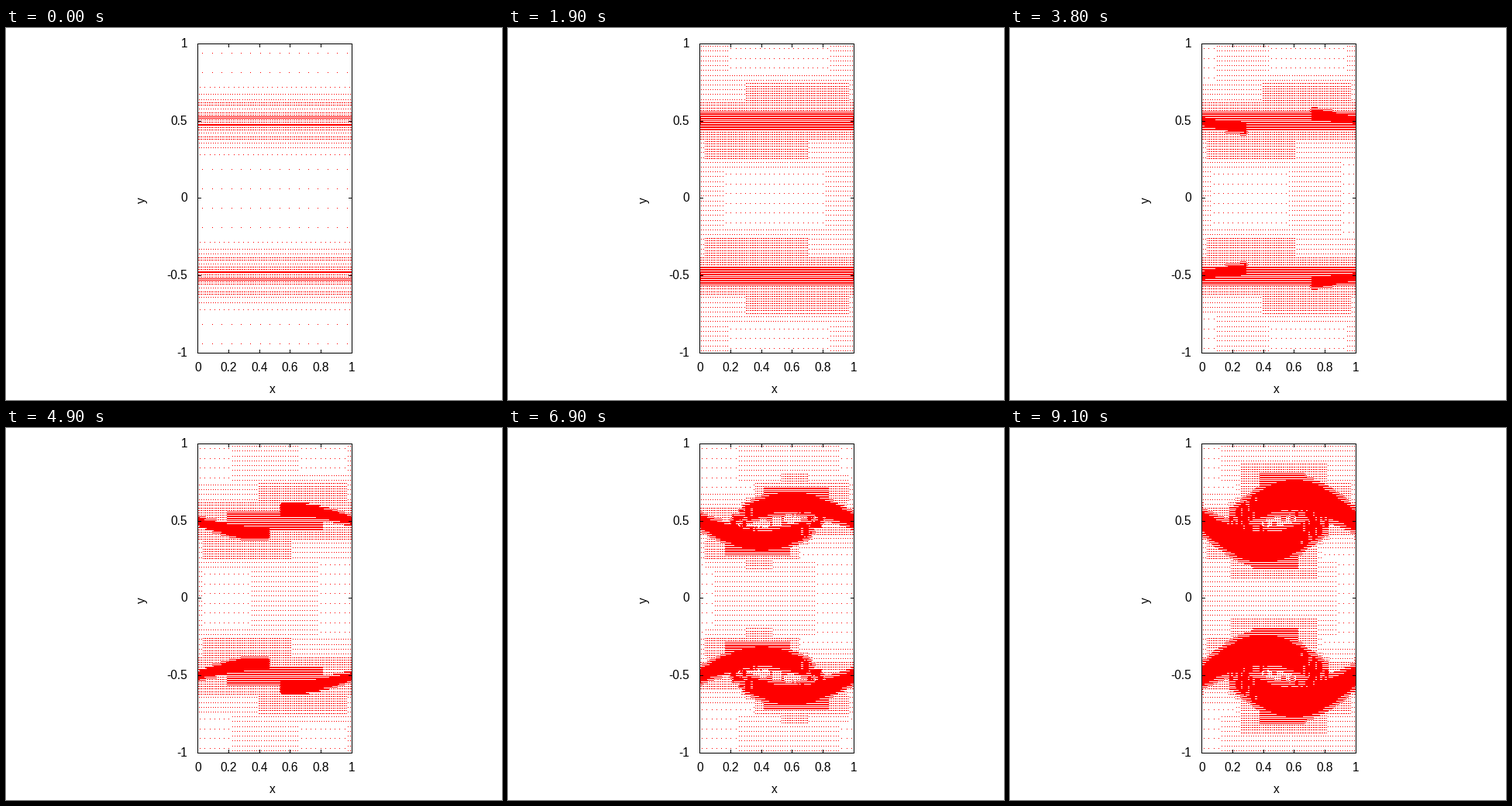
Animation of 640 by 480 pixels, one loop 9200 ms. Source, as a matplotlib script:

```python
import matplotlib.pyplot as plt
import numpy as np
from matplotlib.animation import FuncAnimation

W, H, DPI = 640, 480, 100
FRAMES, INTERVAL = 92, 100
LEFT, TOP, RIGHT, BOTTOM = 247, 20, 446, 419
NX, NY, MAX_LEVEL = 512, 256, 5      # finest cells in the unit square

X = (np.arange(NX) + 0.5)[None, :] / NX
Y = (np.arange(NY) + 0.5)[:, None] / NY
NOISE = np.random.default_rng(4).random((NY // 8, NX // 8)).repeat(8, 0).repeat(8, 1)


def ramp(frame, start, end):
    return min(max((frame - start) / (end - start), 0), 1)


def initial_levels():
    """Uniform rows around the undisturbed layer."""
    edges = np.array([1, 2, 4, 6, 8, 12, 16]) / 64
    levels = np.array([3, 4, 3, 2, 3, 2, 1, 0])
    return levels[np.searchsorted(edges, np.abs(Y - 0.5))] + 0 * X.astype(int)


def raise_level(want, level, region):
    np.maximum(want, level, out=want, where=region & np.ones_like(want, bool))


def box(x0, x1, y0, y1):
    return (X > x0) & (X < x1) & (Y > y0) & (Y < y1)


def add_coarse(want, frame):
    """Level 2: the wide layer and the patches that drift with the flow."""
    raise_level(want, 2, box(0, 1, 0.25 + 0.0625 * ramp(frame, 50, 65), 0.5))
    if frame < 55:
        raise_level(want, 2, box(0, 1 - 0.36 * ramp(frame, 20, 27), 0.1875, 0.25))
    low = 0.8125 * (1 - ramp(frame, 27, 95)) ** 2
    high = 1 - 0.28 * np.sin(np.pi * ramp(frame, 27, 103))
    raise_level(want, 2, box(low, high, 0, 0.25))
    raise_level(want, 2, box(0, 0.1875 * (1 - ramp(frame, 10, 50)), 0, 0.25))
    blip = 0.0625 * (1 - ramp(frame, 10, 18))
    raise_level(want, 2, box(0.5 - blip, 0.5 + blip, 0, 0.25))


def add_medium(want, frame):
    """Level 3: the inner layer, its lower shelf and the late halo."""
    raise_level(want, 3, box(0, 1, 0.375 + 0.03125 * ramp(frame, 50, 65), 0.5))
    if frame > 2:
        high = 0.6 + 0.18 * (1 - ramp(frame, 10, 30)) + 0.15 * ramp(frame, 61, 91)
        raise_level(want, 3, box(1 / 32, high, 0.25, 0.375))
    if frame > 4:
        corner = 0.125 * (1 - ramp(frame, 10, 18))
        raise_level(want, 3, box(0, corner, 0, corner))
    late = ramp(frame, 77, 91)
    middle = 0.39 + 0.08 * late
    half = 0.175 * ramp(frame, 64, 75) + 0.1 * late
    floor = 0.25 - 0.125 * ramp(frame, 64, 75)
    raise_level(want, 3, box(middle - half, middle + half, floor, 0.25))


def add_fine(want, frame):
    """Level 4: the core stripes and the stripes under the rolled layer."""
    if frame < 58:
        inset = 0.22 * ramp(frame, 42, 50)
        raise_level(want, 4, box(inset, 1 - inset, 0.46875 - 0.03125 * ramp(frame, 1, 6), 0.5))
    grow = ramp(frame, 52, 61)
    if grow > 0:
        low = 0.34 - 0.2 * grow + 0.2 * ramp(frame, 65, 91)
        high = 0.37 + 0.2 * grow + 0.05 * ramp(frame, 61, 91)
        floor = 0.375 - 0.0625 * grow - 0.125 * ramp(frame, 61, 93)
        raise_level(want, 4, box(low, high, floor, 0.4))


def add_strand(want, frame, noise):
    """Levels 4 and 5 along the sine-shaped, lengthening shear layer."""
    arch = np.sin(np.pi * np.clip(X / 0.8, 0, 1))
    centre = 0.5 - 0.17 * ramp(frame, 27, 91) ** 0.75 * arch
    thick = 0.034 + 0.06 * ramp(frame, 55, 88)
    half = thick * (0.6 + 0.4 * arch)
    end = 0.82 * np.sin(np.pi / 2 * ramp(frame, 18, 91)) ** 1.2
    offset = np.abs(Y - centre)
    raise_level(want, 4, (offset < half + 0.3 * thick) & (X < end))
    raise_level(want, 5, (offset < half) & (X < end) & ((X < 0.64) | (noise > 0.35)))


def add_eye(want, frame, noise):
    """Broken patches inside the vortex, densest at its rim."""
    radius = np.hypot((X - 0.5) / 0.3, (Y - 0.5) / 0.11)
    inside = radius < 1
    grow = ramp(frame, 64, 91)
    raise_level(want, 3, inside)
    raise_level(want, 4, inside & (noise > 0.9 - 0.2 * grow))
    raise_level(want, 5, inside & (noise > 1.35 - 0.6 * radius - 0.1 * grow))


def wanted_levels(frame):
    if frame == 0:
        return initial_levels()
    want = np.ones((NY, NX), int)
    noise = np.roll(NOISE, 8 * (frame // 4), axis=1)
    for add in (add_coarse, add_medium, add_fine):
        add(want, frame)
    if frame >= 18:
        add_strand(want, frame, noise)
    if frame > 64:
        add_eye(want, frame, noise)
    return np.maximum(want, want[::-1, ::-1])


def pool(mask, n):
    rows, cols = mask.shape
    return mask.reshape(rows // n, n, cols // n, n).any(axis=(1, 3))


def grow_one(mask):
    out = mask | np.roll(mask, 1, 1) | np.roll(mask, -1, 1)
    out[1:] |= mask[:-1]
    out[:-1] |= mask[1:]
    return out


def cell_centres(want):
    """Leaves of a quadtree whose neighbours differ by at most one level."""
    split = [None] * MAX_LEVEL + [np.zeros((NY, NX), bool)]
    for level in range(MAX_LEVEL - 1, -1, -1):
        split[level] = pool(want > level, 2 ** (MAX_LEVEL - level))
        split[level] |= pool(grow_one(split[level + 1]), 2)
    xs, ys = [], []
    exists = np.ones_like(split[0])
    for level in range(MAX_LEVEL + 1):
        rows, cols = np.nonzero(exists & ~split[level])
        xs.append((cols + 0.5) / (16 << level))
        ys.append((rows + 0.5) / (8 << level))
        exists = split[level].repeat(2, 0).repeat(2, 1)
    return np.concatenate(xs), np.concatenate(ys)


def column(x):
    return np.floor(LEFT + (RIGHT - LEFT) * x + 0.5).astype(int)


def row(y):
    return BOTTOM - np.floor((BOTTOM - TOP) * (y + 1) / 2 + 0.5).astype(int)


def draw_axes(image):
    for px in column(np.arange(6) / 5):
        image[TOP:TOP + 5, px] = image[BOTTOM - 4:BOTTOM + 1, px] = 0
    for py in row(np.arange(-2, 3) / 2):
        image[py, LEFT:LEFT + 5] = image[py, RIGHT - 4:RIGHT + 1] = 0
    image[[TOP, BOTTOM], LEFT:RIGHT + 1] = 0
    image[TOP:BOTTOM + 1, [LEFT, RIGHT]] = 0


def picture(frame):
    x, y = cell_centres(wanted_levels(frame))
    image = np.full((H, W, 3), 255, np.uint8)
    for side in (y, -y):
        image[row(side), column(x)] = (255, 0, 0)
    draw_axes(image)
    return image


def label(x, y, text, **style):
    ax.text(x, y, text, family="Liberation Sans", size=15.5 * 72 / DPI, **style)


fig = plt.figure(figsize=(W / DPI, H / DPI), dpi=DPI, facecolor="white")
ax = fig.add_axes([0, 0, 1, 1])
mesh = ax.imshow(picture(0), interpolation="nearest", aspect="auto",
                 extent=(-0.5, W - 0.5, H - 0.5, -0.5))
ax.axis("off")

for value in np.arange(6) / 5:
    label(column(value), 442.5, f"{value:g}", ha="center", va="baseline")
for value in np.arange(-2, 3) / 2:
    label(233.5, row(value) + 4.5, f"{value:g}", ha="right", va="baseline")
label(343, 470.5, "x", ha="center", va="baseline")
label(182, 222, "y", ha="right", va="center", rotation=90)


def update(frame):
    mesh.set_data(picture(frame))
    return [mesh]


anim = FuncAnimation(fig, update, frames=FRAMES, interval=INTERVAL,
                     repeat=True, repeat_delay=0, blit=False)
plt.show()
```
